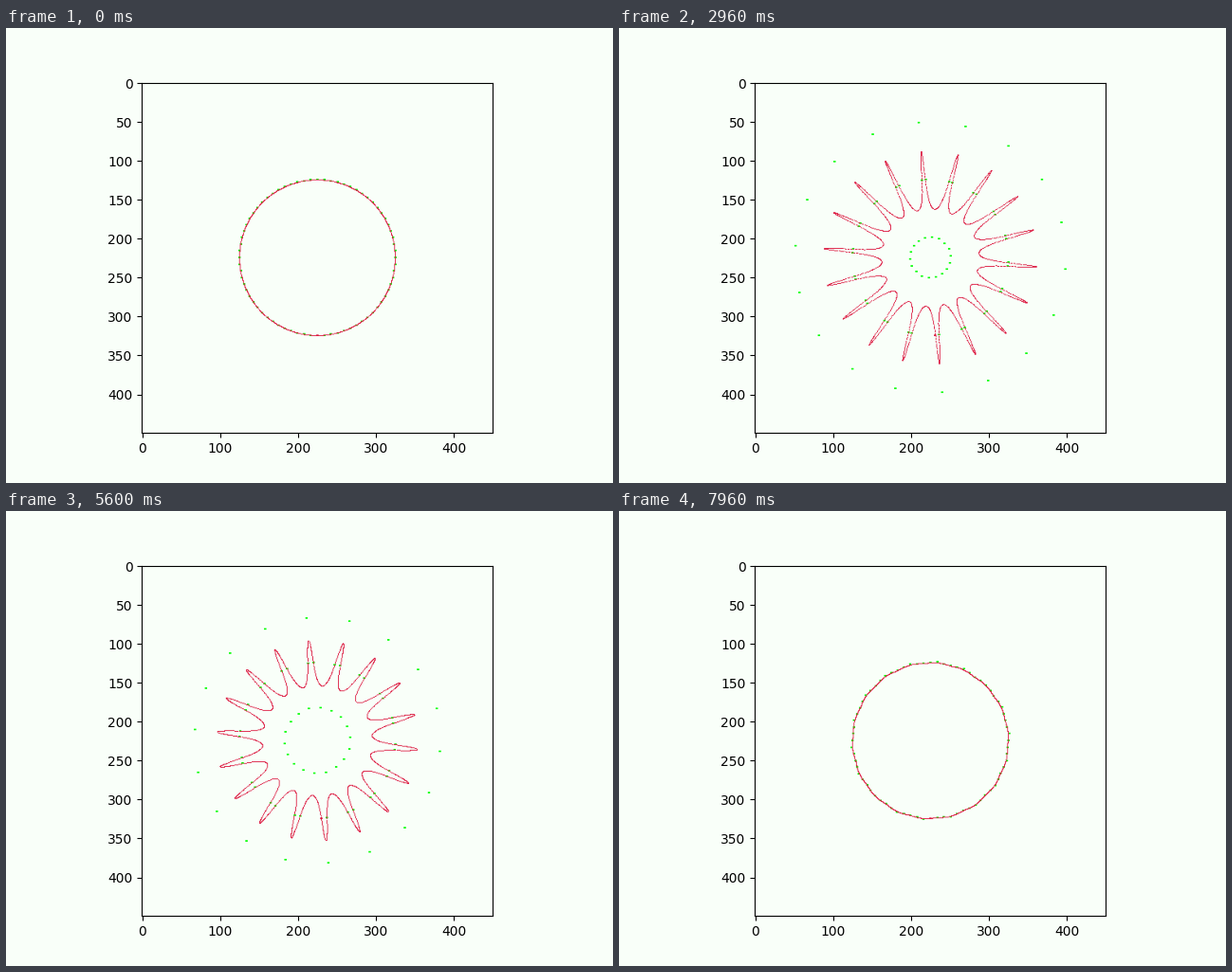
These frames come from a looping animation (640x480 px, 8 s). A matplotlib script:

```python
import numpy as np
import matplotlib.pyplot as plt
from matplotlib.animation import FuncAnimation

SIZE = 450
CENTER = 225
RADIUS = 100
LOBES = 18
FRAMES = 200
STEP = 40

PAPER = (249, 255, 249)
CURVE = (220, 20, 60)
POINT = (0, 255, 0)


def polar(r, deg):
    a = np.radians(deg)
    return np.stack([CENTER + r * np.cos(a), CENTER + r * np.sin(a)], axis=-1)


def control_points(amp):
    """Per lobe: circle point, outer tip, circle point, inner tip."""
    tip = 85 + 360 / LOBES * np.arange(LOBES)
    spread = 5 * (1 - amp / 100)
    pts = [polar(RADIUS, tip - spread), polar(RADIUS + amp, tip),
           polar(RADIUS, tip + spread), polar(RADIUS - amp, tip + 10)]
    return np.stack(pts, axis=1).reshape(-1, 2)


def bezier(a, b, c):
    t = np.linspace(0, 1, 101)[:, None, None]
    return ((1 - t) ** 2 * a + 2 * t * (1 - t) * b + t ** 2 * c).reshape(-1, 2)


def dot(img, x, y, color):
    img[y - 1:y + 1, x - 1:x + 2] = color


def picture(frame):
    amp = 99 - abs(frame - 99)
    img = np.empty((SIZE, SIZE, 3), np.uint8)
    img[:] = PAPER
    pts = control_points(amp)
    ends = pts[::2]
    line = bezier(ends, pts[1::2], np.roll(ends, -1, axis=0))
    x, y = np.rint(line).astype(int).T
    for px, py in np.rint(pts).astype(int):
        dot(img, px, py, POINT)
    img[y, x] = CURVE
    dot(img, *np.rint(pts[2]).astype(int), CURVE)
    return img


fig, ax = plt.subplots(figsize=(6.4, 4.8), dpi=100)
paper = tuple(c / 255 for c in PAPER)
fig.set_facecolor(paper)
ax.set_facecolor(paper)
image = ax.imshow(picture(0))


def update(frame):
    image.set_data(picture(frame))
    return [image]


anim = FuncAnimation(fig, update, frames=FRAMES, interval=STEP, repeat=True)
plt.show()
```
